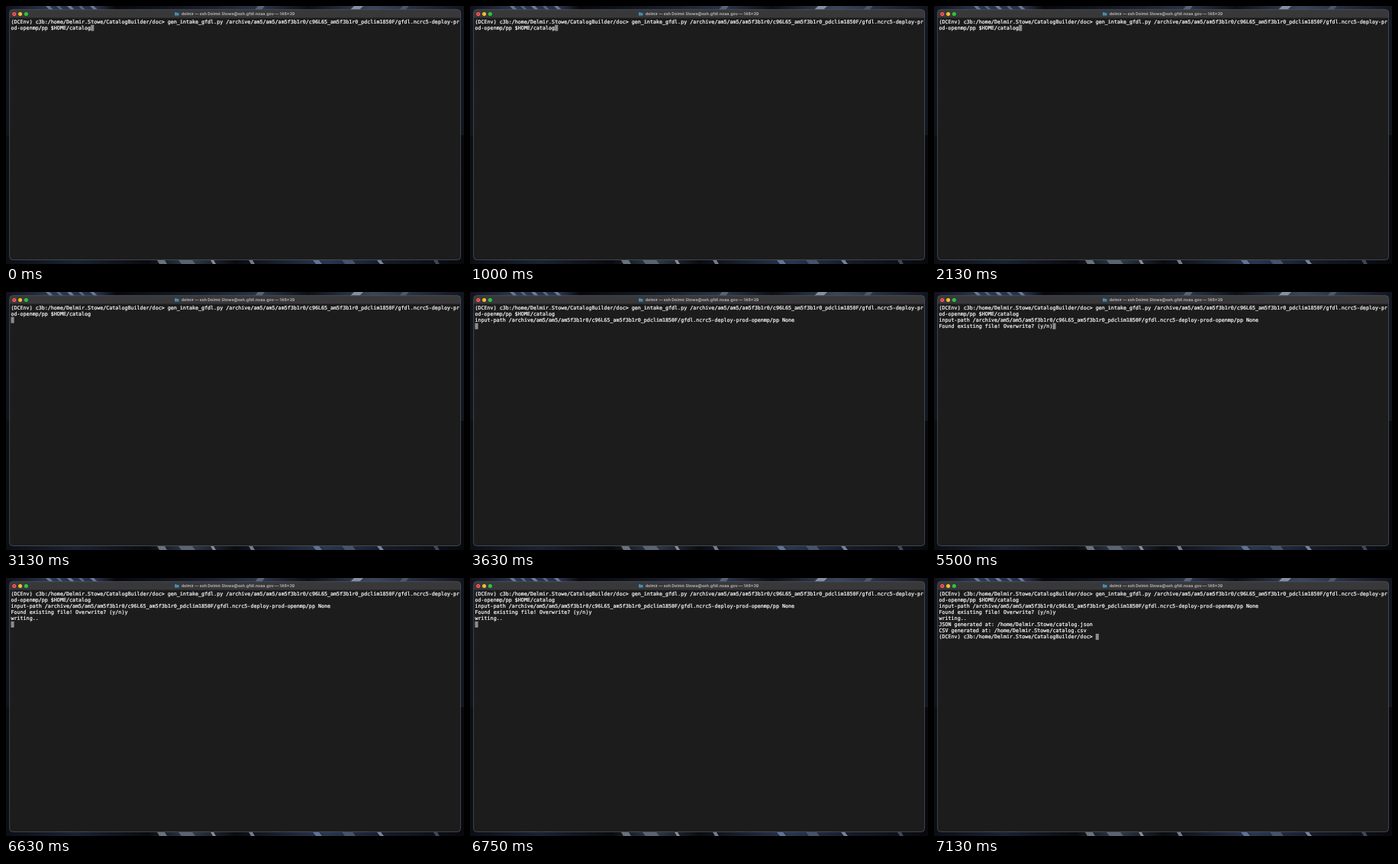
An HTML page for the animation above (8 s loop, 600x338 px).

```html
<!DOCTYPE html>
<html lang="en">
<head>
<meta charset="utf-8">
<title>Catalog builder in a terminal</title>
<style>
  html, body { margin: 0; width: 100%; height: 100%; overflow: hidden; background: #0b0d12; }
  svg { display: block; width: 100vw; height: 100vh; }
  text { text-rendering: geometricPrecision; }
  .title { font: 700 52.8px Inter, "Open Sans", sans-serif; fill: #b4b4b6; text-anchor: middle; }
  .line { font: 66.85px "DejaVu Sans Mono", monospace; fill: #f4f4f4; stroke: #f4f4f4; stroke-width: 2.5; }
</style>
</head>
<body>
<svg viewBox="0 0 600 338">
  <defs>
    <linearGradient id="top">
      <stop offset="0" stop-color="#10131b"/>
      <stop offset=".1" stop-color="#2b3852"/>
      <stop offset=".2" stop-color="#26314a"/>
      <stop offset=".24" stop-color="#07080c"/>
      <stop offset=".42" stop-color="#161d2c"/>
      <stop offset=".56" stop-color="#2a3548"/>
      <stop offset=".66" stop-color="#0c0f16"/>
      <stop offset=".8" stop-color="#39465c"/>
      <stop offset="1" stop-color="#11151e"/>
    </linearGradient>
    <linearGradient id="bottom">
      <stop offset="0" stop-color="#0b0e15"/>
      <stop offset=".15" stop-color="#1a2233"/>
      <stop offset=".31" stop-color="#090b10"/>
      <stop offset=".4" stop-color="#333c4a"/>
      <stop offset=".5" stop-color="#0a0c11"/>
      <stop offset=".7" stop-color="#28364f"/>
      <stop offset=".84" stop-color="#141a26"/>
      <stop offset="1" stop-color="#07090d"/>
    </linearGradient>
  </defs>
  <rect width="600" height="169" fill="url(#top)"/>
  <rect y="169" width="600" height="169" fill="url(#bottom)"/>
  <g id="streaks"></g>

  <rect x="4.7" y="4.7" width="590.8" height="327.8" rx="4" fill="#1c1c1d"/>
  <path d="M4.7 15.4V8.7a4 4 0 0 1 4-4h582.8a4 4 0 0 1 4 4v6.7z" fill="#38383a"/>
  <rect x="4.7" y="4.7" width="590.8" height="327.8" rx="4" fill="none" stroke="#58595c" stroke-width=".7"/>
  <circle cx="10.8" cy="10.4" r="2.5" fill="#fb5f57"/>
  <circle cx="10.8" cy="10.4" r=".8" fill="#7c1712"/>
  <circle cx="18.6" cy="10.4" r="2.5" fill="#fdbc2e"/>
  <circle cx="26.4" cy="10.4" r="2.5" fill="#2ac840"/>
  <path d="M221 8.2h2.2l.6.7h2.7v3.7H221z" fill="#3d8fb8"/>
  <text class="title" transform="translate(304 12.3) scale(.1)">delmir — ssh Delmir.Stowe@ssh.gfdl.noaa.gov — 146×39</text>

  <rect id="cursor" width="4.1" height="8" fill="#8b8b8b"/>
  <g id="screen"></g>
</svg>
<script>
const LOOP = 8000, LEFT = 6.5, TOP = 16.6, COL = 4.025, ROW = 8.06;
const $ = id => document.getElementById(id);

function add(parent, tag, attrs) {
  const el = document.createElementNS('http://www.w3.org/2000/svg', tag);
  for (const key in attrs) el.setAttribute(key, attrs[key]);
  return parent.appendChild(el);
}

// Wallpaper glints: x, width, slant, colour
const glints = {
  0: [[52, 5, 5, '#64799b'], [66, 4, 5, '#51688c'], [80, 5, 5, '#6a7fa2'], [95, 4, 5, '#546a8c'],
      [110, 5, 5, '#66799a'], [330, 9, -4, '#55647c'], [456, 12, -5, '#8190a6'], [520, 8, -5, '#4a586e']],
  333: [[198, 10, 3, '#677180'], [226, 18, 4, '#596473'], [268, 4, 3, '#838e9c'], [318, 5, 3, '#707c8c'],
        [402, 8, 4, '#5e7396'], [440, 14, 4, '#42536f'], [486, 5, 4, '#7485a0'], [560, 5, 3, '#3c485c']]
};
for (const y in glints)
  for (const [x, w, slant, fill] of glints[y])
    add($('streaks'), 'path', { d: `M${x} ${y}h${w}l${slant} 5h${-w}z`, fill });

const home = '/home/Delmir.Stowe';
const prompt = `(DCEnv) c3b:${home}/CatalogBuilder/doc> `;
const source = '/archive/am5/am5/am5f3b1r0/c96L65_am5f3b1r0_pdclim1850F/gfdl.ncrc5-deploy-prod-openmp/pp';
const command = `${prompt}gen_intake_gfdl.py ${source} $HOME/catalog`;

// Output appended at each time, in ms
const steps = [
  [0, command],
  [3130, '\n'],
  [3630, `input-path ${source} None\n`],
  [5500, 'Found existing file! Overwrite? (y/n)'],
  [6500, 'y'],
  [6630, '\nwriting..\n'],
  [7130, `JSON generated at: ${home}/catalog.json\nCSV generated at: ${home}/catalog.csv\n${prompt}`]
];

const wrap = text => text.split('\n').flatMap(line => line.match(/.{1,146}/g) || ['']);

const rows = Array.from({ length: 8 }, (_, i) => add($('screen'), 'text', {
  class: 'line', transform: `translate(${LEFT} ${TOP + i * ROW + 6.3}) scale(.1)`
}));

let shown = 0;
function draw() {
  const t = performance.now() % LOOP;
  const count = steps.filter(([at]) => at <= t).length;
  if (count !== shown) {
    shown = count;
    const lines = wrap(steps.slice(0, count).map(step => step[1]).join(''));
    rows.forEach((row, i) => row.textContent = lines[i] || '');
    const last = lines.length - 1;
    $('cursor').setAttribute('x', LEFT + lines[last].length * COL);
    $('cursor').setAttribute('y', TOP + last * ROW);
  }
  requestAnimationFrame(draw);
}
draw();
</script>
</body>
</html>
```
